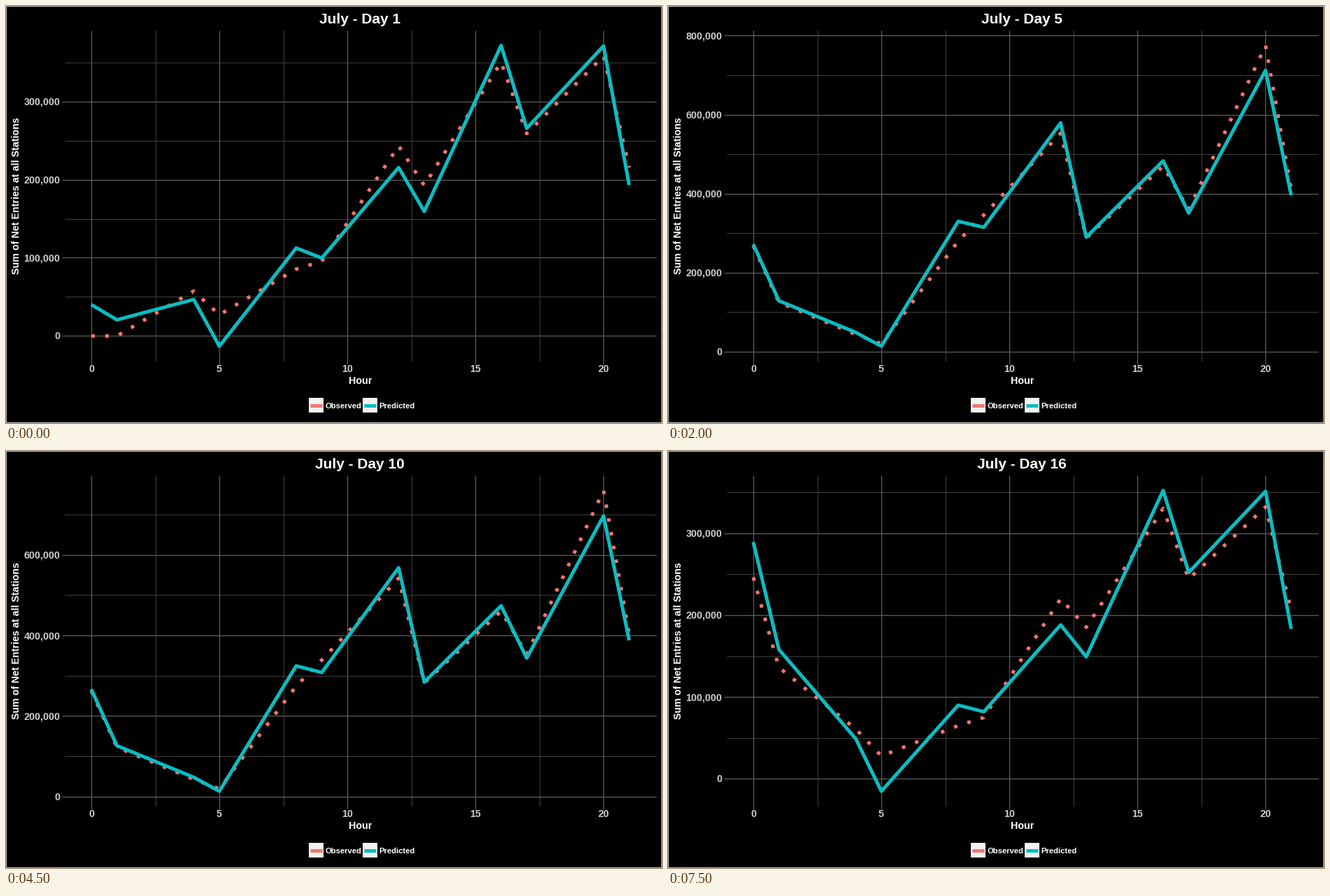
A matplotlib script for the animation above (8 s loop, 938 by 597 pixels).

```python
import numpy as np
import matplotlib.pyplot as plt
from matplotlib.animation import FuncAnimation
from matplotlib.patches import Rectangle

W, H, DPI = 938, 597, 100
LEFT, RIGHT, TOP, BOTTOM = 83.5, 929.5, 35, 508.6
SALMON, TEAL = "#f8766d", "#0bbdc2"
HOURS = np.array([0, 1, 4, 5, 8, 9, 12, 13, 16, 17, 20, 21])

# Typical daily curves in thousands of entries, and the model's error
SUNDAY = np.array([246, 136, 61, 28, 65, 75, 220, 185, 330, 244, 332, 206])
HOLIDAY = np.array([191, 94, 37, 22, 202, 212, 374, 235, 465, 343, 506, 269])
WORKDAY = np.array([268, 125, 44, 20, 280, 346, 553, 288, 470, 360, 775, 412])
REST_ERROR = np.array([43, 22, -12, -43, 25, 7, -32, -36, 22, 8, 19, -23])
WORK_ERROR = np.array([4, 4, 5, -6, 50, -31, 26, 2, 13, -9, -63, -16])


def mix(a, b, t):
    return a + (b - a) * t


def day_curves(day):
    """Observed and predicted entries; work is 0 at rest, 1 on a workday."""
    weekday = (day - 2) % 7  # 0 is Sunday
    work = {0: 0, 6: 0.075}.get(weekday, 0.5 if day == 3 else 1)
    if work <= 0.5:
        observed = mix(SUNDAY, HOLIDAY, work * 2)
    else:
        # slow growth through the month, busiest in midweek
        observed = WORKDAY * (1 + 0.01 * (day - 5) - 0.035 * abs(weekday - 3))
    if day == 1:
        observed[:2] = 0  # counting has just begun
    return observed, observed + mix(REST_ERROR, WORK_ERROR, work)


def px(size):
    return size * 72 / DPI


def x_pos(hour):
    return LEFT + (hour + 1.05) / 23.1 * (RIGHT - LEFT)


fig = plt.figure(figsize=(W / DPI, H / DPI), dpi=DPI, facecolor="#bdbdbd")
ax = fig.add_axes([0, 0, 1, 1])


def label(x, y, s, size, color="white", ha="center", **kw):
    ax.text(x, y, s, fontsize=px(size), color=color, ha=ha, va="baseline",
            family="Liberation Sans", weight="bold", **kw)


def box(x, y, w, h, color):
    ax.add_patch(Rectangle((x, y), w, h, fc=color, lw=0, zorder=0.5))


def stroke(xs, ys, color, width, z, **kw):
    ax.plot(xs, ys, color=color, lw=px(width), zorder=z,
            solid_capstyle="butt", dash_capstyle="butt",
            solid_joinstyle="round", dash_joinstyle="round", **kw)


def grid_line(xs, ys, major):
    color, width, z = ("#5c5c5c", 1.3, 2) if major else ("#3e3e3e", 1, 1)
    stroke(xs, ys, color, width, z)


def grid(low, high, y_pos):
    for hour in np.arange(0, 21, 2.5):
        major = hour % 5 == 0
        x = x_pos(hour)
        grid_line([x, x], [TOP, BOTTOM + 4 * major], major)
        if major:
            label(x, 524.4, f"{hour:.0f}", 14.2, "#cccccc")
    half = 100 if high - low > 600 else 50
    pad = (high - low) * 0.05
    first, last = np.ceil((low - pad) / half), np.floor((high + pad) / half)
    for k in range(int(first), int(last) + 1):
        major = k % 2 == 0
        y = y_pos(k * half)
        grid_line([LEFT - 4 * major, RIGHT], [y, y], major)
        if major:
            label(77.5, y + 5, f"{k * half * 1000:,}", 14.2, "#cccccc", "right")


def legend():
    for x, name, color in ((433, "Observed", SALMON), (510, "Predicted", TEAL)):
        box(x, 561, 21, 21, "#f2f2f2")
        stroke([x + 2, x + 19], [571.5, 571.5], color, 5, 4)
        label(x + 23.2, 576.2, name, 11.3, ha="left")


def draw(i):
    observed, predicted = day_curves(i + 1)
    low = min(observed.min(), predicted.min())
    high = max(observed.max(), predicted.max())

    def y_pos(value):
        share = (value - low) / (high - low)
        return BOTTOM - (share + 0.05) / 1.1 * (BOTTOM - TOP)

    ax.clear()
    ax.set(xlim=(0, W), ylim=(H, 0))
    ax.axis("off")
    box(1, 1, W - 2, H - 2, "black")
    grid(low, high, y_pos)
    xs = x_pos(HOURS)
    stroke(xs, y_pos(observed), SALMON, 5, 5, ls=(0, (1, 3)), snap=False)
    stroke(xs, y_pos(predicted), TEAL, 5, 6, snap=False)
    label(506.3, 24.6, f"July - Day {i + 1}", 20.9)
    label(506.3, 541.4, "Hour", 14.2)
    label(19.5, 271.5, "Sum of Net Entries at all Stations", 14.3,
          rotation=90, rotation_mode="anchor")
    legend()
    return []


anim = FuncAnimation(fig, draw, frames=16, interval=500, repeat=True,
                     repeat_delay=0, init_func=lambda: draw(0))
plt.show()
```
